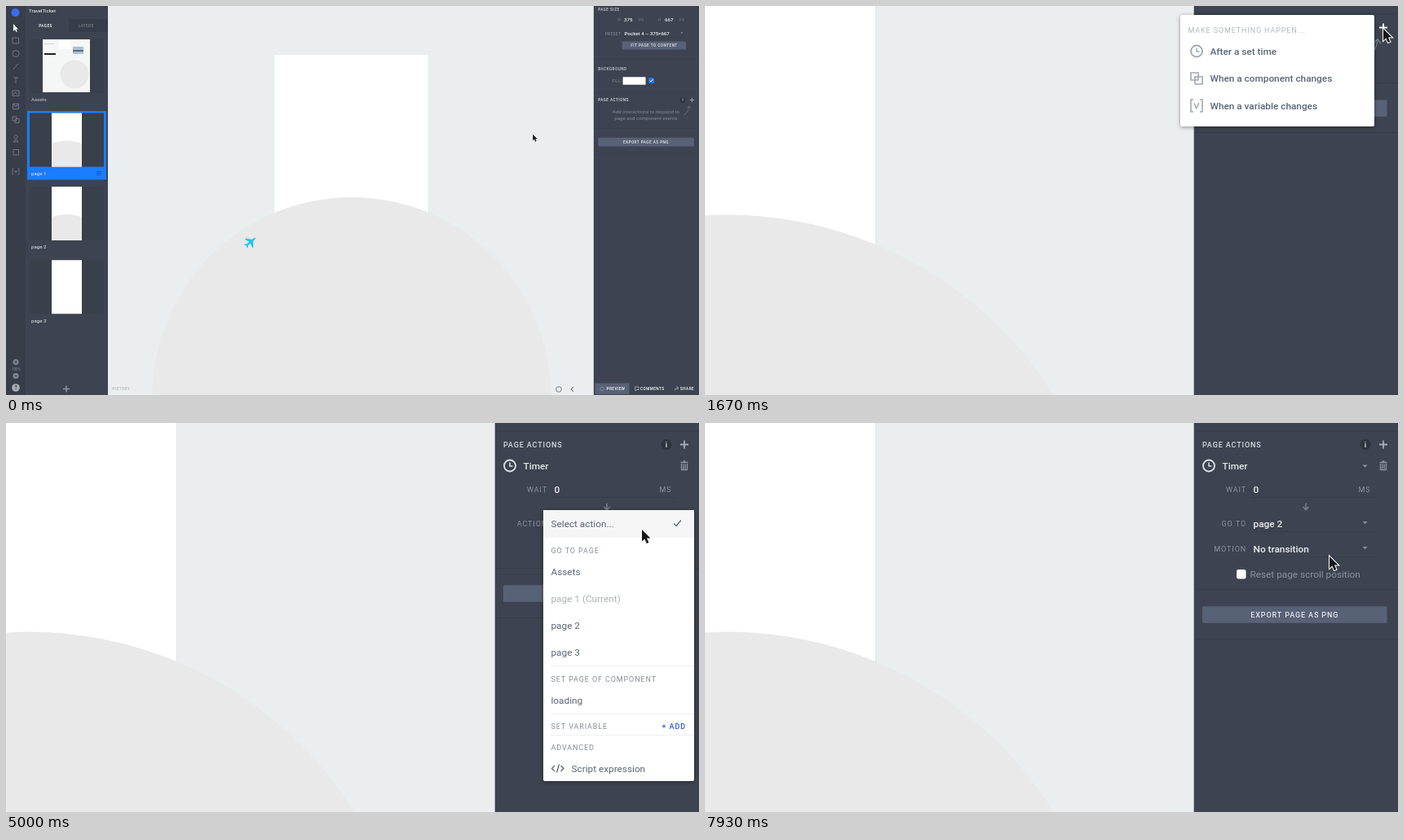
Animation, 850 px wide and 478 px high, one loop 8000 ms. Source, as an HTML page with a canvas:

```html
<!DOCTYPE html>
<html lang="en">
<head>
<meta charset="utf-8">
<title>Prototyping tool: page timer</title>
<style>
  html, body { margin: 0; width: 100%; height: 100%; overflow: hidden; background: #eaeeef; }
  canvas { display: block; width: 850px; height: 478px; }
</style>
</head>
<body>
<canvas id="stage" width="850" height="478"></canvas>
<script>
const g = document.getElementById('stage').getContext('2d');
const LOOP = 8000;
const ZOOM = { scale: 1.926, x: -788.6, y: -196 };
const C = {
  canvas: '#eaeeef', hill: '#e9e9e9', panel: '#3d4350', dark: '#363c48', button: '#586276',
  muted: '#8a93a1', dim: '#747d8b', soft: '#c9ced6', white: '#fff', ink: '#5b6675',
  pale: '#a9b0b8', blue: '#1a7cff'
};

// Pointer path in panel coordinates: time, x, y
const POINTER = [
  [130, 456, 108], [700, 690, 68], [1070, 798, 47], [1470, 832, 28], [1800, 832, 28],
  [2450, 778, 56], [2660, 778, 56], [2730, 773, 55], [3580, 773, 55], [4130, 776, 106],
  [4400, 778, 119], [4540, 780, 131], [5050, 780, 131], [5270, 780, 148], [5900, 780, 244],
  [7380, 780, 244], [7930, 766, 164]
];
const EVENTS_OPEN = 1670, TIMER_ADDED = 3070, ACTIONS_OPEN = 4650, PAGE_CHOSEN = 6730;

const clamp = v => Math.max(0, Math.min(1, v));
const smooth = v => (v = clamp(v), v * v * (3 - 2 * v));

function pointerAt(t) {
  let i = POINTER.findIndex(k => k[0] > t);
  if (i < 0) i = POINTER.length - 1;
  const b = POINTER[i], a = POINTER[Math.max(0, i - 1)];
  const p = a === b ? 0 : clamp((t - a[0]) / (b[0] - a[0]));
  return { x: a[1] + (b[1] - a[1]) * p, y: a[2] + (b[2] - a[2]) * p };
}

function rect(x, y, w, h, color, radius = 0) {
  g.fillStyle = color;
  g.beginPath();
  g.roundRect(x, y, w, h, radius);
  g.fill();
}

function path(d, color, width = 1, dx = 0, dy = 0) {
  g.save();
  g.translate(dx, dy);
  const p = new Path2D(d);
  if (width) {
    g.strokeStyle = color;
    g.lineWidth = width;
    g.stroke(p);
  } else {
    g.fillStyle = color;
    g.fill(p);
  }
  g.restore();
}

function ring(x, y, r, color, width) {
  g.beginPath();
  g.arc(x, y, r, 0, 7);
  if (width) {
    g.strokeStyle = color;
    g.lineWidth = width;
    g.stroke();
  } else {
    g.fillStyle = color;
    g.fill();
  }
}

function text(str, x, y, color, { size = 11.8, weight = 400, align = 'left', spacing = 0 } = {}) {
  g.font = `${weight} ${size}px Roboto, sans-serif`;
  g.letterSpacing = spacing + 'px';
  g.textAlign = align;
  g.fillStyle = color;
  g.fillText(str, x, y + size * 0.355);
}

const caps = (str, x, y, color, align = 'left', weight = 400) =>
  text(str, x, y, color, { size: 9, spacing: 0.88, align, weight });
const smallCaps = (str, x, y, color, align, weight) =>
  text(str, x, y, color, { size: 4.67, spacing: 0.46, align, weight });

const chevron = (x, y) => path('M-3 -1.5H3L0 1.8Z', C.muted, 0, x, y);
const separator = y => rect(601, y, 249, 1, C.dark);

function clock(x, y, color) {
  ring(x, y, 7, color, 1.8);
  path('M0 -4V0.5H3.5', color, 1.5, x, y);
}

function wideButton(label, x, y, w, h) {
  rect(x, y, w, h, C.button, 1.5);
  caps(label, x + w / 2, y + h / 2, '#e3e6ea', 'center', 500);
}

function popup(x, y, w, h) {
  g.save();
  g.shadowColor = 'rgba(0,0,0,.4)';
  g.shadowBlur = 5;
  g.shadowOffsetY = 1;
  rect(x, y, w, h, C.white, 2);
  g.restore();
}

function drawArtboard() {
  rect(125, 0, 596, 478, C.canvas);
  rect(328.6, 60, 189.8, 336, '#dde2e4');
  rect(329, 60, 189, 336, C.white);
  g.save();
  g.beginPath();
  g.rect(125, 0, 596, 478);
  g.clip();
  ring(424, 479.5, 244.5, C.hill);
  g.restore();

  g.save();
  g.translate(300, 290);
  g.rotate(0.86);
  path('M0 -8Q1.4 -7 1.4 -3L7 1.4V3L1.4 1.2L1 5L3 6.8V8L0 7L-3 8V6.8L-1 5L-1.4 1.2L-7 3V1.4L-1.4 -3Q-1.4 -7 0 -8Z', '#19c8f2', 0);
  g.restore();

  smallCaps('HISTORY', 130, 470.5, '#a3aab0');
  ring(678, 471, 3.3, '#59616c', 0.8);
  path('M696 468L693 471L696 474', '#59616c', 1);
}

function thumbnail(y, name, hill) {
  rect(29, y, 91, 66, '#393f4b');
  rect(56, y, 37, 66, C.white);
  if (hill) {
    g.save();
    g.beginPath();
    g.rect(56, y, 37, 66);
    g.clip();
    ring(74.5, y + 82, 48, C.hill);
    g.restore();
  }
  text(name, 31, y + 74.3, C.soft, { size: 6.1, weight: 500 });
}

function drawSidebar() {
  rect(0, 0, 125, 478, C.panel);
  rect(0, 0, 24, 478, '#373d49');
  ring(11.5, 8, 5, '#3a6df0');
  text('TravelTicket', 28, 6, C.white, { size: 6.15 });
  rect(77, 16, 48, 16, C.dark);
  smallCaps('PAGES', 48.5, 24.5, C.white, 'center', 500);
  smallCaps('LAYERS', 98, 24.5, C.muted, 'center');

  rect(29, 41, 91, 66, '#393f4b');
  rect(45, 41, 58, 65, '#f5f6f6');
  ring(84, 84, 17.5, C.hill);
  rect(47, 58, 14, 2, '#222');
  rect(82, 50, 13, 9, '#aebfce');
  rect(82, 54, 13, 2, '#526f92');
  rect(65, 43, 14, 10, '#fff');
  rect(47, 46, 12, 1, '#cfd3d6');
  text('Assets', 31, 115.3, C.soft, { size: 6.1 });

  rect(26, 129, 97, 84.5, C.blue);
  thumbnail(131.5, 'page 1', true);
  path('M111 203.5H117M111 205.5H117M111 207.5H117', '#0d53b8', 0.8);
  thumbnail(222, 'page 2', true);
  thumbnail(312.3, 'page 3', false);
  path('M70 470.5H78M74 466.5V474.5', C.muted, 1.6);

  path('M9 22V31L11 29L12.6 32L13.8 31.4L12.3 28.6H15Z', C.white, 0);
  const icon = '#7b8493';
  path('M8 39H15.5V46H8ZM8.5 78L15 71M9 88H15V89M12 88V95M8 104H16V110.5H8ZM9 109L11.5 106L14 109M8.5 120H15.5V126.5H8.5Z' +
       'M10 120V123H14V120M8 136H13V141H8ZM11 138.5H16V143.5H11ZM9 176.5H15.5V183H9ZM9.5 200H8V207H9.5M14.5 200H16V207H14.5M10.5 202L12 205L13.5 202', icon, 0.8);
  ring(12, 58.5, 4, icon, 0.8);
  ring(12, 161, 2.2, icon, 0.8);
  path('M9 167Q12 162 15 167Z', icon, 0.8);
  ring(12, 437.5, 3.6, icon);
  ring(12, 454.5, 3.6, icon);
  path('M10.3 437.5H13.7M12 435.8V439.2M10.3 454.5H13.7', C.dark, 0.8);
  text('100%', 12.5, 446, C.muted, { size: 4.6, align: 'center' });
  ring(12, 469, 4.8, '#a7aeb8');
  text('?', 12, 469, C.dark, { size: 6.5, weight: 700, align: 'center' });
}

function drawFooter() {
  rect(722.5, 463.5, 42, 13.5, C.button, 1);
  ring(731, 470.5, 2.2, C.muted, 0.7);
  path('M771.5 468H776V471.5H773.5L772 473ZM820 472.5Q820.5 469.5 823.5 469.5M822.5 467.5L825 469.5L822.5 471.5', C.soft, 0.7);
  smallCaps('PREVIEW', 736.5, 470.5, C.white, 'left', 500);
  smallCaps('COMMENTS', 778, 470.5, C.white, 'left', 500);
  smallCaps('SHARE', 827, 470.5, C.white, 'left', 500);
}

function field(label, y, value) {
  caps(label, 664, y, C.muted, 'right');
  text(value, 672.5, y - 0.5, '#eceef1', { weight: 500 });
  rect(670, y + 9, 152, 1, C.dark);
}

function drawPageSettings() {
  caps('PAGE SIZE', 610, -187, C.soft, 'left', 500);
  [[656, '375', 'W'], [752, '667', 'H']].forEach(([x, value, name]) => {
    caps(name, x, -163, C.dim);
    text(value, x + 15.5, -163, '#eceef1', { weight: 500 });
    caps('PX', x + 50, -163, C.dim);
  });
  field('PRESET', -130.5, 'Pocket 4 – 375×667');
  chevron(808, -132);
  wideButton('FIT PAGE TO CONTENT', 667, -112, 151, 19);
  separator(-71);
  caps('BACKGROUND', 610, -47, C.soft, 'left', 500);
  caps('FILL', 664, -18.5, C.muted, 'right');
  rect(668.5, -28, 54, 18.5, C.white, 1.5);
  rect(729.5, -26, 13, 13, C.blue, 2);
  path('M732.5 -19.5L735 -16.8L739.8 -22.8', C.white, 1.8);
  separator(9.5);
}

function drawActions(t, pointer) {
  caps('PAGE ACTIONS', 610, 26.5, '#d9dde2', 'left', 500);
  ring(810, 26.5, 6.5, '#2e343e');
  text('i', 810, 26.5, C.soft, { size: 9, weight: 700, align: 'center' });
  const adding = t >= EVENTS_OPEN && t < 2000;
  path('M827 26.5H837M832 21.5V31.5', adding ? C.white : '#a5acb7', 1.8);

  if (t < TIMER_ADDED) {
    text('Add interactions to respond to', 723, 54.5, '#858e9b', { align: 'center' });
    text('page and component events', 723, 68.5, '#858e9b', { align: 'center' });
    path('M812 62.5Q823 57 825 42M820 46L825 40.5L829 46.5', '#747d8b', 1.3);
    separator(94);
    wideButton('EXPORT PAGE AS PNG', 610, 115.5, 226.5, 20.5);
    separator(155);
    return;
  }

  const chosen = t >= PAGE_CHOSEN;
  const menuOpen = t >= ACTIONS_OPEN && !chosen;
  const end = chosen ? 204 : 178;
  clock(618, 52.5, '#dfe2e7');
  text('Timer', 634.5, 53, '#e3e6ea', { weight: 500 });
  if (!menuOpen && pointer.y < end) chevron(809.5, 53);
  path('M-4.5 -4H4.5M-1.5 -5.5H1.5M-3.5 -2.5V5H3.5V-2.5M-1.2 -2V4M1.2 -2V4', '#8a93a1', 1.3, 832, 52.5);

  field('WAIT', 82, '0');
  caps('MS', 801.5, 82, C.muted);
  path('M0 -4.5V3.5M-3.5 0L0 3.8L3.5 0', C.dim, 1.6, 737, 103);
  field(chosen ? 'GO TO' : 'ACTION', 124, chosen ? 'page 2' : 'Select action...');
  chevron(809.5, 122.5);
  if (chosen) {
    field('MOTION', 155, 'No transition');
    chevron(809.5, 153.5);
    rect(652, 180, 11.5, 11.5, C.white, 2.5);
    text('Reset page scroll position', 668.5, 186, C.muted);
  }
  separator(end);
  wideButton('EXPORT PAGE AS PNG', 610, end + 21.2, 226.5, 20.5);
  separator(end + 61);
}

function hoverRow(x, y, w, h, pointer) {
  if (pointer.x > x && pointer.x < x + w && pointer.y >= y && pointer.y < y + h) rect(x, y, w, h, '#f5f5f5');
}

function drawEventMenu(pointer) {
  popup(583, 11, 238, 137);
  caps('MAKE SOMETHING HAPPEN...', 592.5, 30, '#b4bac1');
  ['After a set time', 'When a component changes', 'When a variable changes'].forEach((name, i) => {
    const y = 56 + i * 33.2;
    hoverRow(583, y - 16.6, 238, 33.2, pointer);
    text(name, 619.5, y, C.ink, { weight: 500 });
  });
  clock(603, 55.5, '#a3a9b1');
  path('M596 82H605V91H596ZM601 87H610V96H601Z', '#a3a9b1', 1.6);
  path('M599 115H596V130H599M607 115H610V130H607M600 119.5L602.5 125.5Q605.5 122 605.5 119', '#a3a9b1', 1.6);
}

function drawActionMenu(pointer) {
  popup(659, 107, 185, 333);
  const rows = [['Select action...', 124], ['Assets', 183], ['page 1 (Current)', 216], ['page 2', 249],
                ['page 3', 282], ['loading', 341], ['Script expression', 424.5]];
  rows.forEach(([name, y], i) => {
    const disabled = i === 2;
    if (!disabled) hoverRow(659, y - 17, 185, i ? 33 : 34, pointer);
    text(name, i === 6 ? 693.5 : 668.5, y, disabled ? C.pale : C.ink);
  });
  path('M819 123.5L822 126.5L828 119.5', C.ink, 1.2);
  [['GO TO PAGE', 156.5], ['SET PAGE OF COMPONENT', 314.5], ['SET VARIABLE', 373], ['ADVANCED', 398.5]]
    .forEach(([name, y]) => caps(name, 668.5, y, '#858e99'));
  caps('+ ADD', 804.5, 373, '#2c55dc', 'left', 500);
  [298, 357, 383].forEach(y => rect(668, y, 176, 1, '#eeeff0'));
  path('M673 421L669.5 424.5L673 428M680.5 421L684 424.5L680.5 428M678.5 419.5L675.5 429.5', C.ink, 1.3);
}

function drawPointer(t, { x, y }) {
  const overHint = t < 1470 && x > 640 && x < 804 && y > 40 && y < 78;
  if (overHint) {
    path('M-3 -8Q0 -8 0 -6Q0 -8 3 -8M0 -6V6M-3 8Q0 8 0 6Q0 8 3 8M-2 2H2', '#a9b0b9', 1.2, x, y);
    return;
  }
  const arrow = 'M0 0V14.5L3.4 11.4L5.8 17L8.4 15.9L6 10.5H10.5Z';
  path(arrow, C.white, 2, x, y);
  path(arrow, '#15171b', 0, x, y);
}

function draw(t) {
  const pointer = pointerAt(t);
  const zoom = smooth((t - 490) / 1000);
  const s = 1 + (ZOOM.scale - 1) * zoom;
  g.setTransform(s, 0, 0, s, ZOOM.x * zoom, ZOOM.y * zoom);
  drawArtboard();
  drawSidebar();
  rect(720.5, 0, 0.5, 478, '#aab1b9');
  rect(721, 0, 132, 478, C.panel);
  drawFooter();

  // Panel contents are laid out in zoomed-in coordinates
  g.scale(1 / ZOOM.scale, 1 / ZOOM.scale);
  g.translate(-ZOOM.x, -ZOOM.y);
  drawPageSettings();
  drawActions(t, pointer);
  if (t >= EVENTS_OPEN && t < TIMER_ADDED) drawEventMenu(pointer);
  if (t >= ACTIONS_OPEN && t < PAGE_CHOSEN) drawActionMenu(pointer);
  drawPointer(t, pointer);
}

const start = performance.now();
function tick() {
  draw((performance.now() - start) % LOOP);
  requestAnimationFrame(tick);
}
tick();
</script>
</body>
</html>
```
